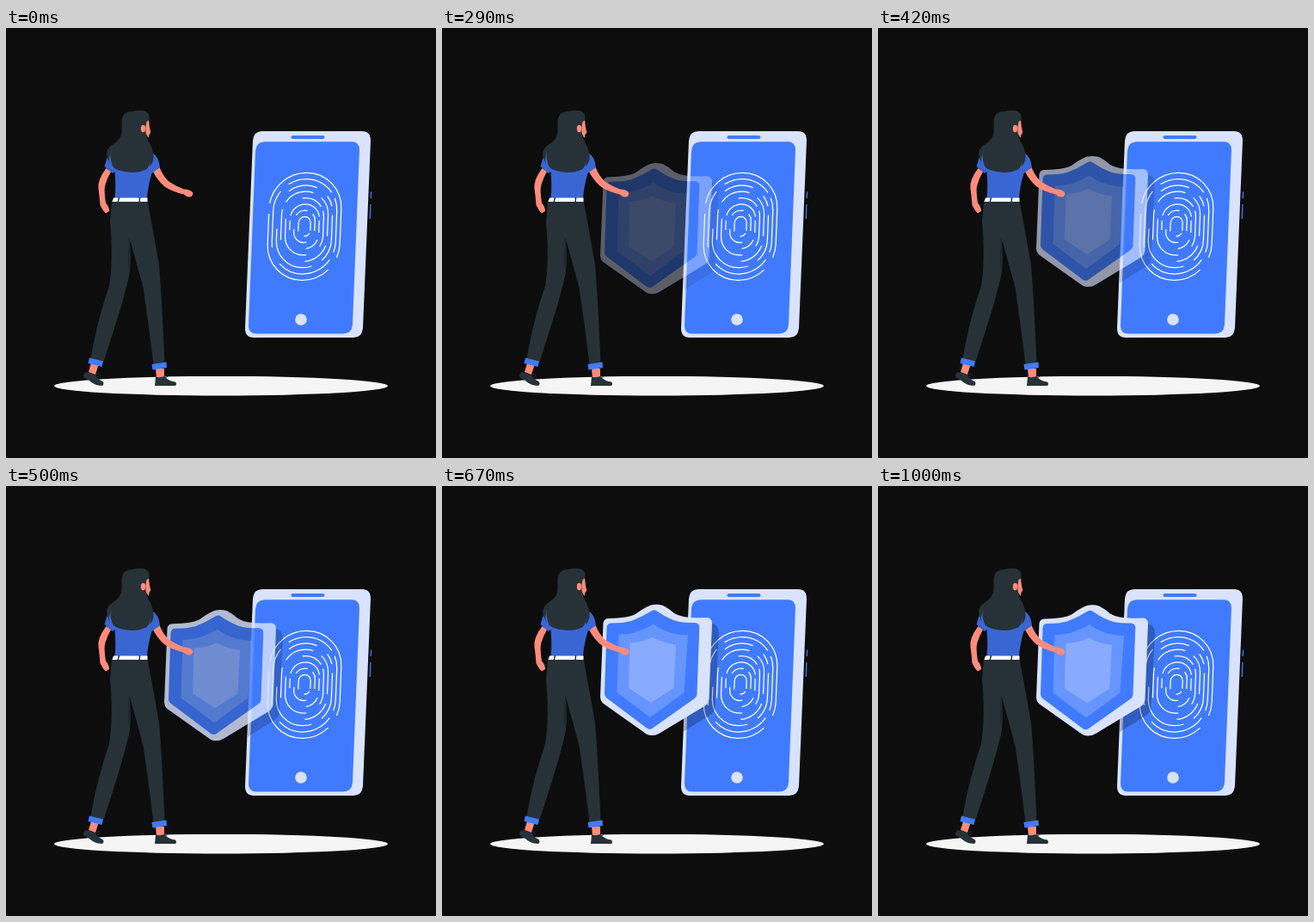
An HTML page that plays this animation: 500 px wide and 500 px high, repeating every 1040 ms.

```html
<!DOCTYPE html>
<html lang="en">
<head>
<meta charset="utf-8">
<title>Phone security</title>
<style>
  html, body { margin: 0; width: 100%; height: 100%; overflow: hidden; background: #0d0d0d; }
  svg { display: block; width: 100vw; height: 100vh; }
  .dark { fill: #263238; }
  .skin { fill: #ff8b7b; }
  .blue { fill: #407bff; }
  .pale { fill: #d9e3ff; }
  .shirt { fill: #3a66d3; }
  .line { fill: none; stroke: #fff; stroke-width: 1.25; }
</style>
</head>
<body>
<svg viewBox="0 0 500 500">
  <ellipse cx="250" cy="416.2" rx="194" ry="11.3" fill="#f5f5f5"/>

  <g id="phone">
    <path class="pale" d="M298 120H414Q424 120 424 131L415 349Q414 360 404 360H288Q278 360 278 349L287 131Q288 120 298 120Z"/>
    <path class="blue" d="M301 132.300H402Q411 132.300 411 142L403 345Q402 355.500 392 355.500H291Q282 355.500 282 346L290 143Q291 132.300 301 132.300Z"/>
    <rect class="blue" x="331.500" y="125" width="39" height="4" rx="2"/>
    <circle class="pale" cx="343" cy="339" r="6.800"/>
    <path d="M424.600 190.500l-.3 7.500M423.900 205l-.6 17" fill="none" stroke="#407bff" stroke-width="1.300"/>
    <g id="print" class="line" transform="matrix(1 0 -.04 1 347 230.800)"></g>
  </g>

  <g id="shield" opacity="0">
    <path d="M312 160Q322 161 322 171L317.500 259Q317 263 313 266L281 286L287 160Z" opacity=".25"/>
    <path class="pale" d="M243 139Q250 137.500 257 139.500Q264 143 270 148.500Q280 155 308 153.500Q314 154 314 160L310.500 248Q310 253 306 256L253 288Q249 290.500 244 290.500Q239 290.500 235 287L187 253Q184 250 184 246L187.500 160Q188 154.500 194 154.500Q217 154 225 149.500Q235 142 243 139Z"/>
    <path class="blue" d="M244 145.500Q247 143.800 250 146Q263 155 274 158Q282 159.500 294 159.500Q299.500 160 299.300 165L296.500 243Q296.300 246 293 248L245 282Q241.500 284.500 238 282L191.500 247Q189 245 189 242L191.500 165Q192 160 197 160Q211 160 220 157.500Q232 153 244 145.500Z"/>
    <path fill="#6695ff" d="M246 161Q255 168 267 171.500Q276 174 286 174L281.500 240.500L242 269.500L203.500 240.500L205.500 173Q216 173 225 170.500Q236 167 246 161Z"/>
    <path fill="#88abff" d="M245 176.500Q256 183 272 185L269.500 235.500L243 252.500L217 235.500L218.500 183Q234 182 245 176.500Z"/>
  </g>

  <g id="woman">
    <path class="skin" d="M99 390L107.500 392L104 403L96 400ZM174 396H184V407H175Z"/>
    <path class="dark" d="M92 400.500Q98 400 104.500 404Q107 409 112.500 411Q115 414.500 111.500 416Q102 415.500 97 410L90 406Q90 402 92 400.500ZM174 405.500Q179 407 184 405Q190 411 197 411.500Q199 414 197 416H173Z"/>
    <path d="M104 403.500l5-2M105.500 406l4-2M184 407l4-1.500" fill="none" stroke="#263238" stroke-width=".9"/>
    <path class="dark" d="M123 201H164.500Q172 241 178 275Q181 310 184.500 390L171.500 392Q168 360 159.500 302Q151 270 143.500 244Q146 270 144 283Q141 304 113.500 388L98.500 384Q106 340 120 300Q125 270 121 225Z"/>
    <path d="M142 241Q146 270 144 282L141.500 274Z" opacity=".18"/>
    <path class="blue" d="M97 383.500L113 387.500L111.500 394L95.500 390ZM169.500 391L186.500 388.500L187 395L170.500 397.500Z"/>
    <path class="skin" d="M116.500 163Q106 177 107.500 187Q109 198 109.500 206Q113 213 116 215.500L120 213Q120 208 116 203.500Q113.500 188 115.500 182Q118 174 122 167Z"/>
    <path class="skin" d="M171 167L178.500 162Q183 173 190 179Q198 184 207 187.500Q212 187 216 190Q219 193 215.500 196Q211 198 207 193.500Q192 190 184 184Q176 177 171 167Z"/>
    <path class="shirt" d="M121 143Q117 151 114.500 161L124 169L126.500 167Q128 185 126.500 198H164Q165 184 169.500 169L179 162Q178 150 170 145Z"/>
    <path fill="#fff" d="M125 197.500H164.500V202H123.500Z"/>
    <path d="M131.500 197l-1.200 5M155.500 197l-.3 5" fill="none" stroke="#263238" stroke-width="1.500"/>
    <path class="skin" d="M160 107L166 106.500Q166.500 115 168.300 121.500L166.500 124L165.500 128L161 120Z"/>
    <path class="dark" d="M134.500 109Q135 97 147 97Q153 95 160 96Q167 98 166.500 104Q167 108 163.500 109Q162 114 162.500 121Q163 128 168 136Q172 144 171.500 153Q169 161 163 164.500Q155 168 146 168Q132 167 126 163Q118 156 117 147Q117 140 124 135.500Q135 129 134.500 119Z"/>
    <ellipse class="skin" cx="159.500" cy="117" rx="2.700" ry="4.200"/>
    <path class="shirt" d="M122 143Q120 151 125 163Q120 158 120 153ZM168.500 151Q168 159 163 165L167 162Z"/>
  </g>
</svg>
<script>
  const LOOP = 1040, FPS = 24, RISE = 30;

  // Visible stretches of each ring, in percent clockwise from its top.
  const rings = [
    [[-17.2, 35.6], [40.5, 79.3]],
    [[-7, 11.6], [14, 35], [38, 60], [67, 89]],
    [[-8, 5], [11, 16], [20, 41], [46, 74]],
    [[-12, 4], [9, 30], [35, 49], [68, 84]],
    [[-2, 12], [15, 38], [48, 80]],
    [[-16, 17], [20, 30], [36, 48], [72, 80]],
    [[-12, 3], [10, 30], [47, 72]],
    [[-34, 33], [38, 50]]
  ];

  function ringPath(i, turn) {
    const r = 42 - 5 * i, h = 62.5 - 7.3 * i, s = 2 * (h - r);
    const arc = (x, y) => `a${r} ${r} 0 0 1 ${x} ${y}`;
    const right = arc(r, r) + `v${s}` + arc(-r, r);
    const left = arc(-r, -r) + `v${-s}` + arc(r, -r);
    return turn ? `M0 ${h}${left}${right}` : `M0 ${-h}${right}${left}`;
  }

  const print = document.getElementById('print');
  rings.forEach((parts, i) => parts.forEach(([from, to]) => {
    const turn = from < 0;
    const start = turn ? from + 50 : from;
    const path = document.createElementNS('http://www.w3.org/2000/svg', 'path');
    path.setAttribute('d', ringPath(i, turn));
    path.setAttribute('pathLength', 100);
    path.setAttribute('stroke-dasharray', `0 ${start} ${to - from} 200`);
    print.append(path);
  }));

  function bezier(x1, y1, x2, y2) {
    const at = (a, b, s) => 3 * (1 - s) ** 2 * s * a + 3 * (1 - s) * s * s * b + s ** 3;
    return x => {
      let lo = 0, hi = 1;
      for (let k = 0; k < 24; k++) {
        const mid = (lo + hi) / 2;
        if (at(x1, x2, mid) < x) lo = mid; else hi = mid;
      }
      return at(y1, y2, (lo + hi) / 2);
    };
  }

  const ease = bezier(.36, -.01, .5, 1.38);
  const shield = document.getElementById('shield');
  const begin = performance.now();

  function draw(now) {
    const time = Math.max(0, now - begin) % LOOP;
    const step = Math.floor((time + 5) * FPS / 1000);
    const p = step < 2 ? 0 : ease(Math.min(1, (step + .85) / FPS));
    shield.setAttribute('transform', `translate(0 ${RISE * (1 - p)})`);
    shield.setAttribute('opacity', Math.max(0, Math.min(1, p)));
    requestAnimationFrame(draw);
  }
  draw(begin);
</script>
</body>
</html>
```
